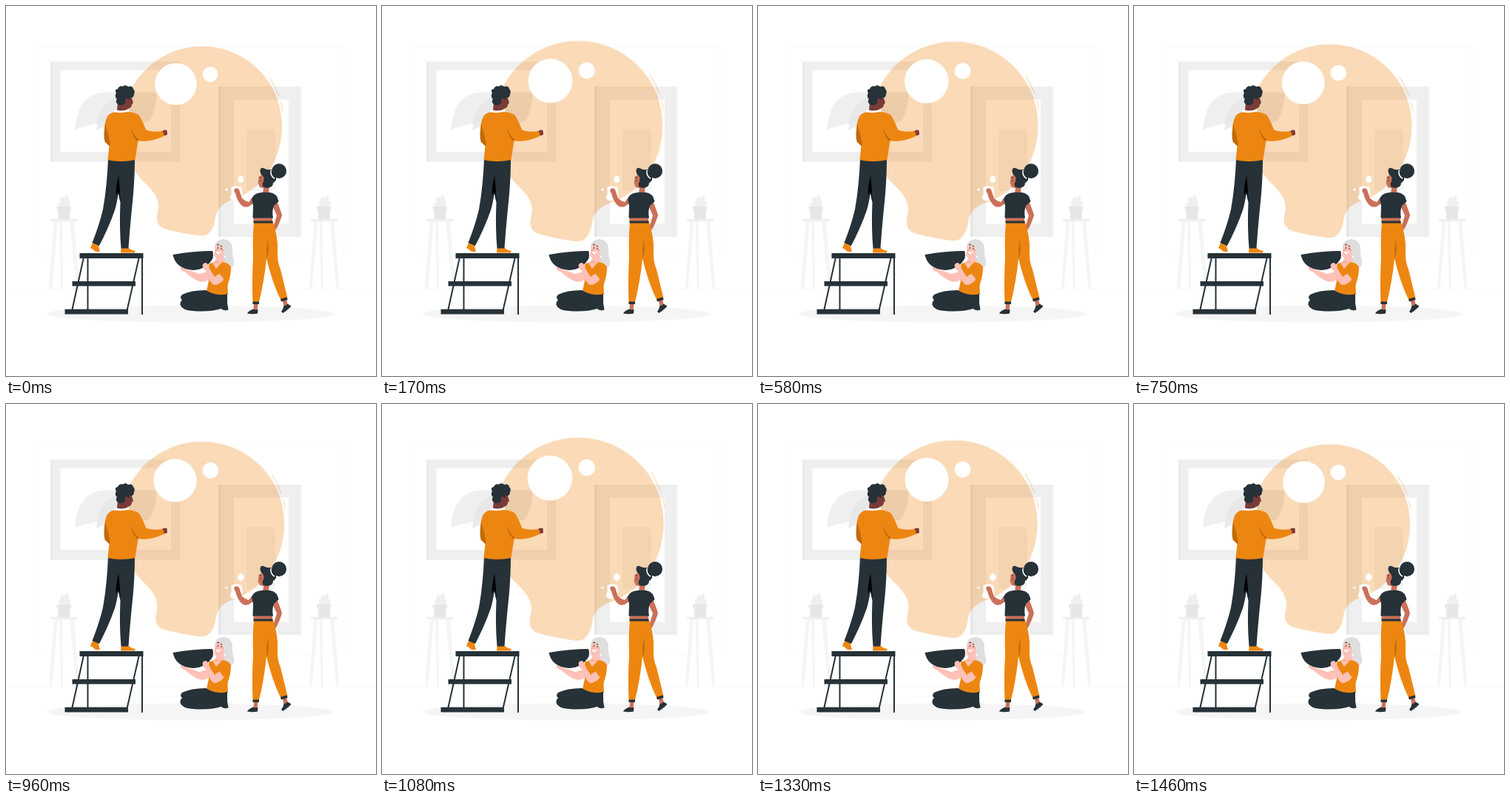
An HTML page for the animation above (1500 ms loop, 500 by 500 pixels).

```html
<!DOCTYPE html>
<html lang="en">
<head>
<meta charset="utf-8">
<title>Painting a light bulb</title>
<style>
  html, body { margin: 0; width: 100%; height: 100%; overflow: hidden; background: #fff; }
  svg { display: block; width: 100vw; height: 100vh; }
  .orange { fill: #ed8611; }
  .dark { fill: #263238; }
  .rust { fill: #ca7059; }
  .brown { fill: #7a3b38; }
  .pink { fill: #ffc0b7; }
  .hair { fill: #dedede; }
  .white { fill: #fff; }
  .g1 { fill: #f5f5f5; }
  .g2 { fill: #efefef; }
  .g3 { fill: #e6e6e6; }
  .line { fill: none; stroke: #f9f9f9; }
  .bar { fill: none; stroke: #263238; stroke-width: 2; }
  .fold { fill: #a95d09; opacity: .65; }

  /* 24 pictures per second, the last one held */
  #bulb {
    transform-origin: 265px 182.3px;
    animation: beat 1.5s -5ms infinite;
  }
  @keyframes beat {
    0%      { transform: scale(1);   animation-timing-function: steps(7); }
    19.444% { transform: scale(1.1); animation-timing-function: steps(14); }
    58.333% { transform: scale(1);   animation-timing-function: steps(7); }
    77.778% { transform: scale(1.1); animation-timing-function: steps(7); }
    97.222%, 100% { transform: scale(1); }
  }
</style>
</head>
<body>
<svg viewBox="0 0 500 500">
  <defs>
    <g id="stool">
      <path class="g1" d="M65 291h5L62 382h-4zM72 291h4L77 382h-3zM86 291h6L99 382h-4z"/>
      <path class="g2" d="M60.500 288h36v3h-36z"/>
      <path class="g2" d="M72 271Q70 263 73 264Q75 266 75 271zM75 271Q72 258 76 258Q80 258 79 271zM79 271Q78 256 82 256Q86 256 84 271zM83 271Q83 264 86 264Q88 265 86 271z"/>
      <path class="g3" d="M68.500 271h19.500v4h-1l-1 13h-15l-1-13h-1.500z"/>
    </g>
  </defs>

  <g id="room">
    <path class="line" d="M39 55.500H240V337.500H39zM252 55.500H457V337.500H252z"/>
    <path class="line" d="M0 382.500H500M208 395.500h32"/>
    <path class="g2" d="M60.500 75H235V210.500H60.500z"/>
    <path class="g3" d="M60.500 75h2v135.500h-2z"/>
    <path class="white" d="M73.500 86.500H223V197H73.500z"/>
    <path class="g2" d="M93 167Q97 124 124 118Q140 115 154 117Q150 145 138 157Q112 160 93 167z"/>
    <path class="g3" d="M122 168Q124 132 150 122Q174 114 203 117Q204 142 192 157Q148 154 122 168z" opacity=".8"/>
    <path class="g2" d="M287 109H399V312H287z"/>
    <path class="g3" d="M287 109h3.500v203h-3.500z"/>
    <path class="white" d="M308 126.500H382V294.500H308z"/>
    <path class="g1" d="M325 171Q325 166 330 166H359Q364 166 364 171V250H325z"/>
    <use href="#stool"/>
    <use href="#stool" x="351.500"/>
    <ellipse class="g1" cx="249.500" cy="416" rx="193.500" ry="11.500"/>
  </g>

  <g id="bulb">
    <path class="orange" opacity=".3" d="M265 54.500C324.500 54.500 373 102.500 373 162C373 208 346 248 308 261C292 266 285 274 283 286C281 302 274 312 262 310.500Q240 308 219 302.500C207 300 203 293 204 284L206 273C207 261 200 251 190 241C168 221 157.500 194 157.500 162C157.500 102.500 205.500 54.500 265 54.500z"/>
    <circle class="white" cx="229.500" cy="105.500" r="28.300"/>
    <circle class="white" cx="276" cy="92.300" r="10.400"/>
    <path d="M357 98Q364 109 369 122M371.500 130Q373.500 136 374 143" fill="none" stroke="#ed8611" stroke-opacity=".3" stroke-width="1.100"/>
  </g>

  <g id="splat" class="white">
    <ellipse cx="317.300" cy="234.300" rx="4.200" ry="5"/>
    <path d="M304 246Q307 242 313 244Q320 243 319 250Q321 262 312 263Q304 264 302.500 259Q306 253 304 246z"/>
    <path d="M298 245.500l.7 2 2 .8-2 .8-.7 2-.7-2-2-.8 2-.8z"/>
  </g>

  <g id="steps">
    <path class="bar" d="M104.700 341L89.500 410M110.500 341V410M179.500 341L162.500 416M184 341V417"/>
    <path class="dark" d="M99.500 334H185.500V341H99.500zM89.500 372H175V378.500H89.500zM79.500 409.700H165V416.500H79.500z"/>
  </g>

  <g id="man">
    <path class="orange" d="M117 320L114 327Q117 328 121 332L127 332Q125 327 125 323zM155.500 327H165.500Q169 330 175 331L174 333.500H155z"/>
    <path class="dark" d="M138 207Q156 211 174 207C174 240 171 265 169 285Q167 305 165.500 327.500H155.500Q153 300 154.500 265L152 252Q150 266 147 276Q139 299 126 324L116.500 320Q126 296 131 275C135 252 137 230 138 207z"/>
    <path d="M152 229Q148 246 149 256L152 252L154.500 266Q154 244 152 229z"/>
    <path class="brown" d="M151 130L150 141Q157 145 164 141V139Q170 138 170 133L172 131L169.500 123L158 121z"/>
    <path class="brown" d="M210 169.500Q214 166.500 217.500 168L218 174L213 175.500z"/>
    <path class="white" d="M147 140Q156 143 165.500 139.500L167 145H146z"/>
    <path class="orange" d="M146 143.500Q136 145 134 158Q131 178 134 184L139.500 189L137.500 208Q155 212 174.500 208L178.500 182Q194 185 214 175.500L212 169Q195 171 189 167Q185 156 180 148Q176 144 165 143Q156 145 146 143.500z"/>
    <path class="fold" d="M168 163Q172 175 179 180L178.500 183Q171 178 168 163zM134 159Q139 174 141 188L139.500 189L134 184Q131.500 176 134 159z"/>
    <path class="dark" d="M151 133Q147 129 150 126Q146 122 149 118Q146 113 151 112Q153 107 158 108.500Q162 106 165 109Q171 107 172 112Q175 115 173 119Q173 125 167 124L166 127Q162 123 161 127Q162 131 159 133Q155 135 151 133z"/>
    <path d="M167.500 126.500h2" stroke="#263238"/>
  </g>

  <g id="painter">
    <path class="rust" d="M365 261Q372 278 373 283Q370 293 365 302L361.500 303L362 296L366 283L360 270z"/>
    <path class="rust" d="M336 255Q330 262 328 265Q322 263 319 260L315 248Q312 245 309 247Q307 250 310 253Q313 265 319 270Q325 274 331 269L338 263z"/>
    <path class="rust" d="M334.500 285H360V293H334.500zM342 230L340.500 239L343 245L348 246L347 253H355L356 238L350 228z"/>
    <path class="rust" d="M335 401H340.500L339.500 412H334.500zM373.500 397L379 396L381 405L376 408z"/>
    <path class="orange" d="M335 292Q350 294 361 292Q368 315 367 330Q366 345 371 356L380.500 395L372 399Q359 372 352 341Q349 372 341.500 402H333.500Q332 370 334 340Q333 312 335 292z"/>
    <path class="fold" d="M354 316Q356 330 353 342Q351 330 354 316z"/>
    <path class="dark" d="M334.500 290.500H360.500V293.500H334.500zM333.500 399.500H342V403H333.500zM371 396L379.500 393.500L380.500 397L372 399.500z"/>
    <path class="dark" d="M334 409.500Q337 411 340.500 410L340 415.500Q334 417 326 415.500Q327 412.500 334 409.500zM375.500 405Q379 405 380.500 402.500L385.500 405.500Q382 410 374 415L372 413Q375 409 375.500 405z"/>
    <path class="dark" d="M340 253Q347 251 357 252Q366 253 368.500 264L362 270Q359 278 361 286.500H333.500L334 270L332 261Q334 255 340 253z"/>
    <path class="dark" d="M343.500 224Q343 218 348 219Q353 222 358 221Q366 226 365 235Q363 238 361 239Q361 245 353 246L348 245Q345 241 348 237Q350 231 345 228z"/>
    <circle class="dark" cx="369" cy="223" r="10"/>
    <path d="M358 222Q357 230 363 233" fill="none" stroke="#fff" stroke-width="1.500"/>
    <path d="M342.500 232.500l2.500-1M344 235v1.500" stroke="#263238"/>
  </g>

  <g id="helper">
    <path class="hair" d="M282 327Q282 316 293 315Q304 315 306 326Q305 335 308 343Q310 352 300 357Q292 349 292 338z"/>
    <path class="pink" d="M284 323Q291 316 297 324Q298 334 293 337L296 346L280 349L284 341Q280 337 282 331z"/>
    <path class="hair" d="M284 324Q290 319 293 326Q294 335 297 339L302 324L294 316L284 320z"/>
    <path class="pink" d="M284 324Q289 320 292 326L294 330L291 337L286 338Q282 336 283 330z"/>
    <path d="M285 322.500l3-.5M290 324l2 1M286.500 326v2M291 327v2" fill="none" stroke="#263238"/>
    <path d="M284 331Q288 334 291 331Q289 336 286 335Q284 334 284 331z" fill="#fff"/>
    <path d="M283.500 329l1.500 1.500M292.500 330h1.500" stroke="#f18b80" stroke-width="1.500"/>
    <circle class="white" cx="296" cy="339" r="1.200"/>
    <path class="orange" d="M274 349Q281 345 290 346Q302 346 304 354Q304 364 299.500 377L300 390Q285 395 270 390L274 371z"/>
    <path class="pink" d="M279 347L284 355L292 346z"/>
    <path class="dark" d="M270 384Q285 393 299 389L299 402L300.500 410Q296 413 291 409Q275 414 252 412Q238 411 235.500 404Q235 400 238 397Q234 394 238 390Q250 384 270 384z"/>
    <path class="pink" d="M235 353Q242 353 246 357Q254 359 261 362L273 359L274 370Q266 375 258 371Q249 366 242 359.500Q236 358 235 353z"/>
    <path class="dark" d="M225.500 336Q254 331 279 331Q280.500 334 279.500 341Q271 356 253 357Q229 355 225.500 336z"/>
    <path class="pink" d="M265.500 350Q268 345 272 348Q275 356 282 366L289 361L295 369Q287 378 281 377Q275 374 270 358Q266 356 265.500 350z"/>
    <path class="orange" d="M288 361L297 352L304 355Q303 363 295 370z"/>
    <path class="dark" d="M286 404Q295 403 300.500 410Q296 413 291 409z"/>
  </g>
</svg>
</body>
</html>
```
